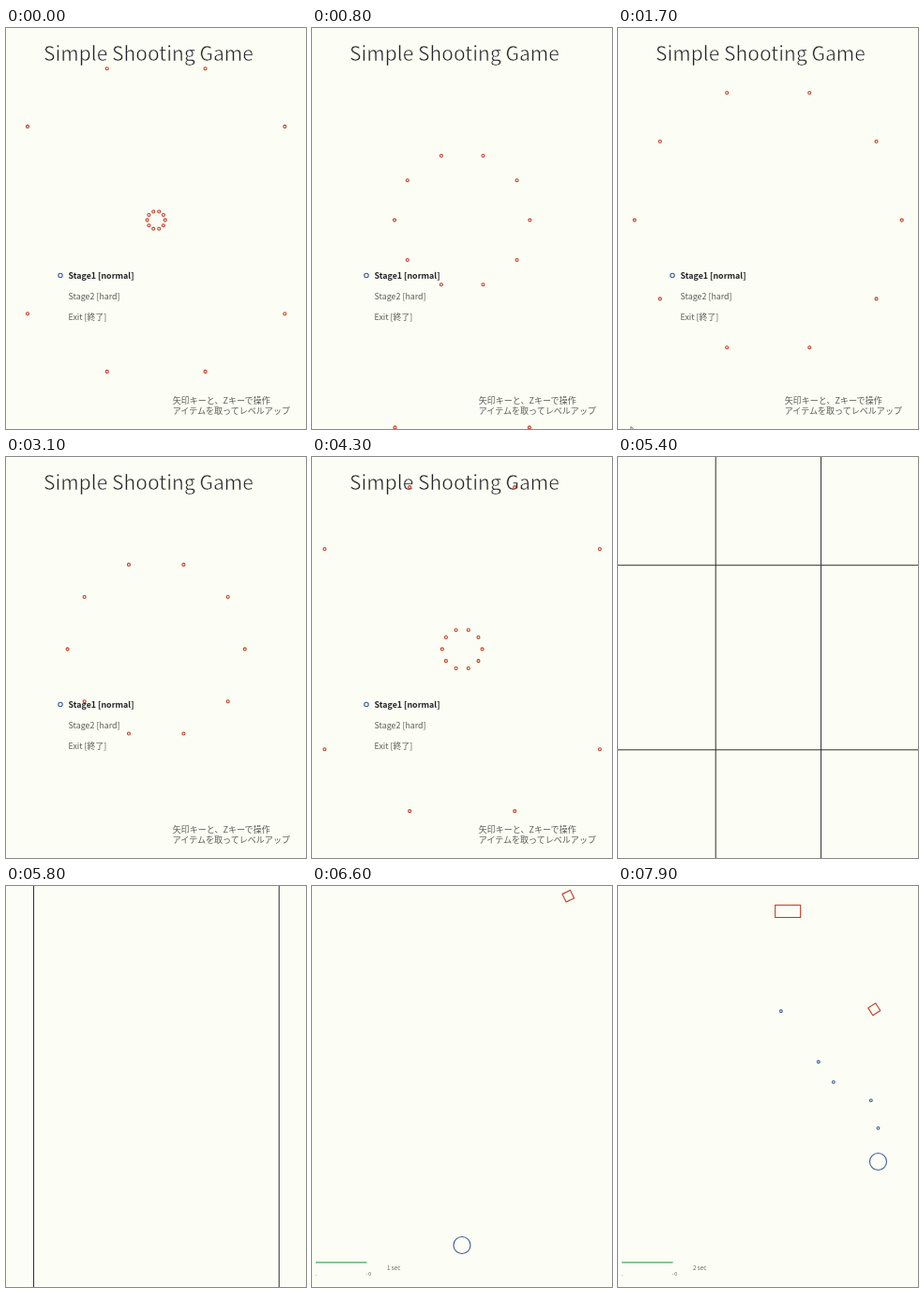
Write an HTML page that moves like this. It is 320 px wide and 427 px high and loops after 8 s.

```html
<!DOCTYPE html>
<html lang="ja">
<head>
<meta charset="utf-8">
<title>Simple Shooting Game</title>
<style>
  :root { --paper: #fcfdf4; }
  html, body { margin: 0; width: 100%; height: 100%; overflow: hidden; background: var(--paper); }
  svg { display: block; width: 100vw; height: 100vh; }
  text { font: 8.9px "Noto Sans CJK JP", "Noto Sans", sans-serif; fill: #5c5c58; }
  /* A paper-coloured outline thins the strokes to a light weight. */
  text.title { font-size: 21px; font-weight: 300; fill: #24242a; stroke: var(--paper); stroke-width: 0.55px; }
  text.chosen { font-weight: 700; fill: #24242a; }
  text.note { font-size: 9.05px; }
  text.hud { font-size: 6.2px; }
  .foe { fill: none; stroke: #c23c26; stroke-width: 1.1; }
  .hero { fill: none; stroke: #3a5c96; stroke-width: 1.1; }
  .line { stroke: #2c2c30; }
</style>
</head>
<body>
<svg viewBox="0 0 320 427">
  <g id="menu">
    <text class="title" x="40" y="35.2">Simple Shooting Game</text>
    <text class="chosen" x="66.5" y="266.7">Stage1 [normal]</text>
    <text x="66.5" y="288.7">Stage2 [hard]</text>
    <text x="66.5" y="310.8">Exit [終了]</text>
    <text class="note" x="177.7" y="400.3">矢印キーと、Zキーで操作</text>
    <text class="note" x="177.7" y="410.8">アイテムを取ってレベルアップ</text>
    <circle class="hero" cx="58" cy="263.5" r="2.2"/>
    <path id="pointer" d="M13.8 424.5v2.5M13.8 424.5l3 2.5" stroke="#77777a" fill="none"/>
    <g id="rings"></g>
  </g>
  <g id="grid"></g>
  <g id="game">
    <path d="M4 400.8H58.5" stroke="#3aa862" stroke-width="1.2"/>
    <text class="hud" x="3.5" y="414.5">.</text>
    <text class="hud" x="57.5" y="415" style="font-size:5px">- 0</text>
    <text class="hud" id="clock" x="80" y="409"></text>
    <rect class="foe" id="block" y="20.3" width="27" height="13.2"/>
    <rect class="foe" id="spinner" x="-4.7" y="-4.7" width="9.4" height="9.4"/>
    <circle class="hero" id="player" r="9"/>
    <g id="shots"></g>
  </g>
</svg>
<script>
const LOOP = 8000, MENU_END = 5100, GAME_START = 5900;
const CX = 160.2, CY = 204.6, RING_GAP = 160, SHOT_SPEED = 0.216;
const fireTimes = [6747, 6997, 7097, 7347, 7736];
const ringTravel = [[0, 9.5], [1700, 142.5], [3100, 254.5], [4300, 341.3], [5100, 402]];
const playerX = [[6660, 160], [7395, 277.5]];
const playerY = [[7130, 382.5], [7690, 293.5]];

const $ = id => document.getElementById(id);

function add(parent, tag, attrs) {
  const el = document.createElementNS("http://www.w3.org/2000/svg", tag);
  parent.appendChild(el);
  return set(el, attrs);
}

function set(el, attrs) {
  for (const key in attrs) el.setAttribute(key, attrs[key]);
  return el;
}

function show(el, visible) {
  el.style.display = visible ? "" : "none";
}

// Linear interpolation through [time, value] points, held at both ends.
function along(points, t) {
  if (t <= points[0][0]) return points[0][1];
  for (let i = 1; i < points.length; i++) {
    const [t0, v0] = points[i - 1], [t1, v1] = points[i];
    if (t <= t1) return v0 + (v1 - v0) * (t - t0) / (t1 - t0);
  }
  return points[points.length - 1][1];
}

const bullets = Array.from({ length: 20 }, () => add($("rings"), "circle", { class: "foe", r: 1.5 }));
const lines = Array.from({ length: 4 }, () => add($("grid"), "path", { class: "line" }));
const shots = fireTimes.map(() => add($("shots"), "circle", { class: "hero", r: 1.4 }));

function drawMenu(t) {
  const inner = along(ringTravel, t) % RING_GAP;
  bullets.forEach((bullet, i) => {
    const radius = inner + (i < 10 ? 0 : RING_GAP);
    const angle = i * Math.PI / 5;
    set(bullet, { cx: CX + radius * Math.cos(angle), cy: CY + radius * Math.sin(angle) });
  });
  show($("pointer"), t >= 1650 && t < 1850);
}

function drawGrid(t) {
  const dx = (t - MENU_END) * 56 / 300, dy = (t - MENU_END) * 98 / 300;
  lines.forEach((line, i) => {
    const side = i % 2 ? 1 : -1;
    const d = i < 2 ? `M${160.4 + side * dx} 0V427` : `M0 ${213.5 + side * dy}H320`;
    set(line, { d });
  });
}

function drawGame(t) {
  const sec = Math.max(0, Math.floor((t - 5150) / 1000));
  $("clock").textContent = sec + " sec";
  set($("player"), { cx: along(playerX, t), cy: along(playerY, t) });
  set($("block"), { x: 167.5 + (t - 7900) * 0.18 });
  const y = 10.7 + (t - 6600) * 0.0927;
  set($("spinner"), { transform: `translate(273.3 ${y}) rotate(${-26 + (t - 6600) * 0.0645})` });
  fireTimes.forEach((fired, i) => {
    show(shots[i], t >= fired);
    set(shots[i], {
      cx: along(playerX, fired),
      cy: along(playerY, fired) - (t - fired) * SHOT_SPEED
    });
  });
}

function draw(t) {
  const inMenu = t < MENU_END, inGame = t >= GAME_START;
  show($("menu"), inMenu);
  show($("grid"), !inMenu && !inGame);
  show($("game"), inGame);
  if (inMenu) drawMenu(t);
  else if (inGame) drawGame(t);
  else drawGrid(t);
}

const start = performance.now();
function tick() {
  draw((performance.now() - start) % LOOP);
  requestAnimationFrame(tick);
}
tick();
</script>
</body>
</html>
```
